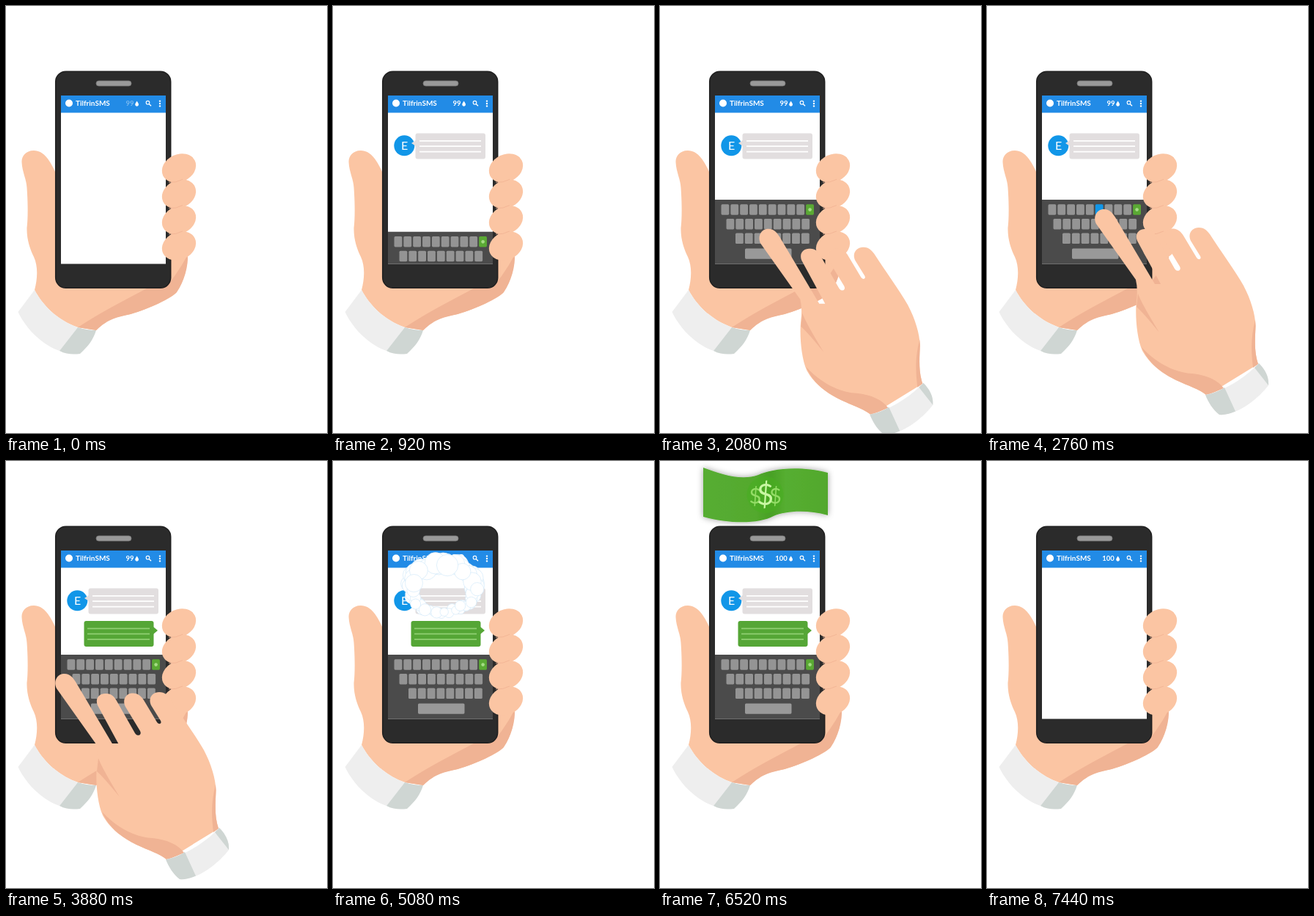
Write an HTML page that moves like this. It is 438x582 px and loops after 7480 ms.

```html
<!DOCTYPE html>
<html lang="en">
<head>
<meta charset="utf-8">
<title>Texting reward</title>
<style>
  html, body { margin: 0; width: 100%; height: 100%; overflow: hidden; background: #fff; }
  svg { display: block; width: 438px; height: 582px; }
  text { font-family: Lato, "Open Sans", sans-serif; fill: #fff; }
  .bold { font-weight: 700; }
  .skin { fill: #fbc5a3; }
  .shade { fill: #f0b394; }
  .cuff { fill: #eee; }
  .fold { fill: #cfd6d3; }
</style>
</head>
<body>
<svg viewBox="0 0 438 582">
  <defs>
    <clipPath id="screen"><rect x="75" y="122" width="143" height="229.5"/></clipPath>
    <filter id="glow" x="-20%" y="-30%" width="140%" height="160%">
      <feDropShadow dx="0" dy="0" stdDeviation="4.5" flood-color="#000" flood-opacity=".38"/>
    </filter>
    <linearGradient id="note">
      <stop offset="0" stop-color="#57ad32"/>
      <stop offset=".42" stop-color="#53a92e"/>
      <stop offset=".54" stop-color="#48a025"/>
      <stop offset=".66" stop-color="#55ae30"/>
      <stop offset="1" stop-color="#52a82e"/>
    </linearGradient>
  </defs>

  <g id="holdingHand">
    <path class="skin" d="M68 228C61 212 52 197 38 197C26 197 21 206 21.5 213C22 226 28 236 28.5 248C30 270 30 290 28.5 302C28 318 33 332 38 342C44 355 43 372 39 387C50 408 70 428 98 438L123 442C140 424 152 424 170 420C195 413 228 397 233 390C244 372 248 355 248 336L220 330L90 300Z"/>
    <path class="shade" d="M98 438C130 417 160 402 192 385L225 375C236 360 245 346 248 337C249 355 243 376 233 390C226 398 195 413 170 420C152 424 140 426 123 442Z"/>
    <path class="cuff" d="M39 387L16.500 417C28 442 52 463 73 470L98 438C70 428 50 408 39 387Z"/>
    <path class="fold" d="M98 438L73 470C82 475 92 475 101 474C112 464 119 455 123 442Q110 442 98 438Z"/>
  </g>

  <rect x="67.700" y="89.200" width="157" height="295" rx="14" fill="#2b2b2b" stroke="#1f1f1f" stroke-width="1.500"/>
  <rect x="123" y="102" width="48" height="7" rx="3.500" fill="#999" stroke="#777" stroke-width=".8"/>
  <rect x="75" y="122" width="143" height="229.500" fill="#fff"/>

  <g clip-path="url(#screen)">
    <rect x="75" y="122" width="143" height="23.500" fill="#228be6"/>
    <circle cx="86" cy="132.500" r="5" fill="#fff"/>
    <text class="bold" x="95" y="136.300" font-size="10">TilfrinSMS</text>
    <path d="M178.600 129.500C180 132 181 133 181 134.300A2.400 2.400 0 0 1 176.200 134.300C176.200 133 177.400 132 178.600 129.500Z" fill="#fff"/>
    <circle cx="193.500" cy="131.700" r="2.300" fill="none" stroke="#fff" stroke-width="1.100"/>
    <path d="M195.200 133.500L198 136.300" stroke="#fff" stroke-width="1.400"/>
    <g fill="#fff"><circle cx="210" cy="129.600" r="1.200"/><circle cx="210" cy="133" r="1.200"/><circle cx="210" cy="136.400" r="1.200"/></g>

    <g id="received">
      <circle cx="97.300" cy="190.300" r="14" fill="#1196e8"/>
      <text x="97.500" y="196" font-size="16" text-anchor="middle">E</text>
      <rect x="112.500" y="173.500" width="95.500" height="35" rx="3" fill="#e2dedf"/>
      <path d="M113 183L107 187L113 191Z" fill="#e2dedf"/>
      <path d="M118 183.800H202M118 191.200H202M118 198.600H202" stroke="#fff" stroke-width="1.700"/>
    </g>
    <g id="sent">
      <rect x="106.500" y="218" width="95" height="35" rx="3" fill="#55a636"/>
      <path d="M201 226L207 231L201 236Z" fill="#55a636"/>
      <path d="M111 228.300H196M111 235.700H196M111 243.100H196" stroke="#8fcf72" stroke-width="1.700"/>
    </g>
    <g id="keyboard"><rect x="75" y="264" width="143" height="88" fill="#4b4b4b"/></g>
  </g>
  <text id="count" class="bold" font-size="9.500" text-anchor="middle"></text>
  <g id="fingers"></g>

  <g id="tapHand">
    <path class="skin" d="M149 297C144 287 150 278 158 277C167 276 172 283 175 288L229 379L237 379L205 320C201 310 208 304 215 304C223 303 228 308 231 314L256 358C259 363 266 361 263 355L243 322C238 312 244 304 252 303.500C260 303 265 308 268 313L286 343C289 347 293 345 291 341L278 320C273 309 281 302 289 302C297 302 301 307 304 311C320 336 338 360 350 381C360 400 366 420 366.500 436C366 452 364 470 370 488L300 531C290 522 275 518 258 510C238 500 222 488 212 470C204 452 202 420 204 402Q206 385 203 373Z"/>
    <path class="shade" d="M206 392Q210 404 235 445Q215 420 204 410Z"/>
    <path class="shade" d="M211 465C232 488 258 500 280 501C300 503 315 510 323 521L300 531C290 522 275 518 258 510C238 500 221 488 211 465Z"/>
    <path class="shade" d="M366 428C359 455 361 475 363 493L370 488C364 470 366 452 366.500 436Z"/>
    <path class="cuff" d="M298 530C325 524 352 507 371 487C379 495 385 505 384 517C372 533 352 548 338 553Q325 558 317 557C308 550 302 540 298 530Z"/>
    <path class="fold" d="M298 530Q312 528 324 520L339 552.500Q326 558 317 557C308 550 302 540 298 530Z"/>
    <path class="fold" d="M371 487L365 493L384 517C385 505 379 495 371 487Z"/>
  </g>

  <path id="drop" d="M0 -29C6 -15 19 -4 19 10A19 19 0 0 1 -19 10C-19 -4 -6 -15 0 -29Z" fill="#1196e8"/>
  <g id="cloud" fill="#fff" stroke="#d3eafa" stroke-width=".7"></g>

  <g id="bill">
    <path filter="url(#glow)" fill="url(#note)" d="M59 9C85 19 112 27 134 19C150 12 185 5 229 16L229 74C200 66 172 68 155 75C135 86 95 86 59 76Z"/>
    <circle cx="143.500" cy="46" r="25" fill="#47b01f" opacity=".55"/>
    <g text-anchor="middle">
      <text x="130" y="58" font-size="29" style="fill:#93dc66">$</text>
      <text x="157.500" y="58" font-size="29" style="fill:#93dc66">$</text>
      <text x="143.500" y="60" font-size="40" style="fill:#c8f7a2">$</text>
    </g>
  </g>
</svg>

<script>
const LOOP = 7480;
const PITCH = 12.85;
const $ = id => document.getElementById(id);

function add(parent, tag, attrs) {
  const el = document.createElementNS("http://www.w3.org/2000/svg", tag);
  for (const name in attrs) el.setAttribute(name, attrs[name]);
  return parent.appendChild(el);
}

// Keyboard: key rows given as [first x, y, count]
const rows = [[83.5, 270.3, 10], [90.5, 290, 9], [103, 309.6, 8]];
const keys = rows.map(([x, y, n]) => Array.from({ length: n }, (_, i) =>
  add($("keyboard"), "rect", { x: x + i * PITCH, y, width: 10.8, height: 14.4, rx: 1.6 })));
add($("keyboard"), "rect", { x: 116, y: 330.5, width: 63.5, height: 14.2, rx: 1.6, fill: "#999" });
add($("keyboard"), "circle", { cx: 204.6, cy: 277.6, r: 2.3, fill: "#a5dc85" });

for (let i = 0; i < 4; i++) {
  const cy = 221 + i * 35.3;
  add($("fingers"), "ellipse", { class: "skin", cx: 236, cy, rx: 24, ry: 18.8,
    transform: `rotate(-25 236 ${cy})` });
  if (i) add($("fingers"), "path", { d: `M222 ${cy - 16}Q232 ${cy - 15} 241 ${cy - 20}`,
    fill: "none", stroke: "#f0b394", "stroke-width": 0.8 });
}

// Ring of puffs, thicker at the top
let seed = 7;
const rand = () => (seed = (seed * 16807) % 2147483647) / 2147483647;
for (let i = 0; i < 60; i++) {
  const a = i * 2.39996, s = Math.sin(a), reach = 0.9 + rand() * 0.2;
  add($("cloud"), "circle", { cx: Math.cos(a) * 45 * reach, cy: s * 32 * reach + 1,
    r: 8.5 - 3.5 * s + rand() * 3 });
}

const clamp = v => Math.max(0, Math.min(1, v));
const span = (t, from, to) => clamp((t - from) / (to - from));
const smooth = u => u * u * (3 - 2 * u);
const easeOut = u => 1 - (1 - u) ** 3;

// Values at time t from steps of [time, ...values]
function track(t, steps, ease = smooth) {
  if (t <= steps[0][0]) return steps[0].slice(1);
  for (let i = 1; i < steps.length; i++) {
    const [a, b] = [steps[i - 1], steps[i]];
    if (t < b[0]) {
      const u = ease(span(t, a[0], b[0]));
      return a.slice(1).map((v, k) => v + (b[k + 1] - v) * u);
    }
  }
  return steps[steps.length - 1].slice(1);
}

// Taps as [time, row, column]
const taps = [[1680, 1, 4], [1960, 1, 5], [2220, 2, 0], [2480, 1, 5],
  [2760, 0, 5], [3020, 1, 1], [3340, 0, 9]];
const handSteps = [[1120, -144, 312], [1440, -82, 16]];
for (const [time, r, c] of taps) {
  const dx = rows[r][0] + c * PITCH - 147.75, dy = rows[r][1] - 270.3;
  handSteps.push([time - 50, dx, dy], [time + (r || c < 9 ? 60 : 120), dx, dy]);
}
handSteps.push([3880, -80, 13], [4180, -144, 312]);

function place(el, x, y, scale = 1, cx = 0, cy = 0) {
  el.setAttribute("transform", `translate(${x + cx} ${y + cy}) scale(${scale}) translate(${-cx} ${-cy})`);
}
function show(el, opacity) {
  el.setAttribute("opacity", opacity);
  el.style.display = opacity > 0 ? "" : "none";
}

function drawScreen(t) {
  const gone = 1 - span(t, 6960, 7420);
  const got = span(t, 360, 640), sent = span(t, 3480, 3640);
  show($("received"), got * gone);
  place($("received"), 0, 0, 0.6 + 0.4 * easeOut(got), 97, 190);
  show($("sent"), sent * gone);
  place($("sent"), 0, 0, 0.6 + 0.4 * easeOut(sent), 204, 235);

  const [ky] = track(t, [[680, 88], [1160, 0], [6960, 0], [7420, 88]]);
  place($("keyboard"), 0, ky);
  keys.forEach((row, r) => row.forEach((key, c) => {
    const lit = taps.some(([time, tr, tc]) => tr === r && tc === c && Math.abs(t - time - 15) < 75);
    const send = r === 0 && c === 9;
    key.setAttribute("fill", send ? (lit ? "#83cf58" : "#5aa934") : lit ? "#1196e8" : "#949494");
  }));

  const hundred = t >= 5000;
  const count = $("count");
  count.textContent = hundred ? "100" : "99";
  show(count, hundred ? 1 : 0.38 + 0.62 * span(t, 0, 120));
  const [pop] = track(t, [[5000, 1], [5080, 1.75], [5320, 1]]);
  place(count, hundred ? 165.5 : 169, 133 + 3.3 * pop, pop);
}

function drawBill(t) {
  const bill = $("bill");
  show(bill, t < 7420 ? span(t, 5120, 5240) : 0);
  if (t < 6520) {
    const [x, y, s] = t < 5560
      ? track(t, [[5120, 6, 126, 0.1], [5560, 0, 20, 0.96]], easeOut)
      : track(t, [[5560, 0, 20, 0.96], [6520, 0, 0, 1]], u => u);
    place(bill, x, y, s, 144, 46);
  } else {
    const u = (t - 6520) / 880;
    place(bill, 0, -17.6 * u - 78 * u * u, 1 + 0.02 * u, 144, 46);
  }
}

function draw(t) {
  drawScreen(t);

  show($("tapHand"), t > 1120 && t < 4180 ? 1 : 0);
  place($("tapHand"), ...track(t, handSteps));

  show($("drop"), t < 4980 ? span(t, 4220, 4400) : 0);
  const fall = span(t, 4480, 4980) ** 2;
  place($("drop"), 121 + 24 * fall, 90 + 88 * fall, 0.3 + 0.7 * easeOut(span(t, 4220, 4480)));

  show($("cloud"), t >= 4990 ? 1 - span(t, 5160, 5480) : 0);
  const [puff] = track(t, [[4980, 0.3], [5080, 1], [5480, 1.6]], u => u);
  place($("cloud"), 150, 172, puff);

  drawBill(t);
}

const start = performance.now();
function tick() {
  draw((performance.now() - start) % LOOP);
  requestAnimationFrame(tick);
}
tick();
</script>
</body>
</html>
```
